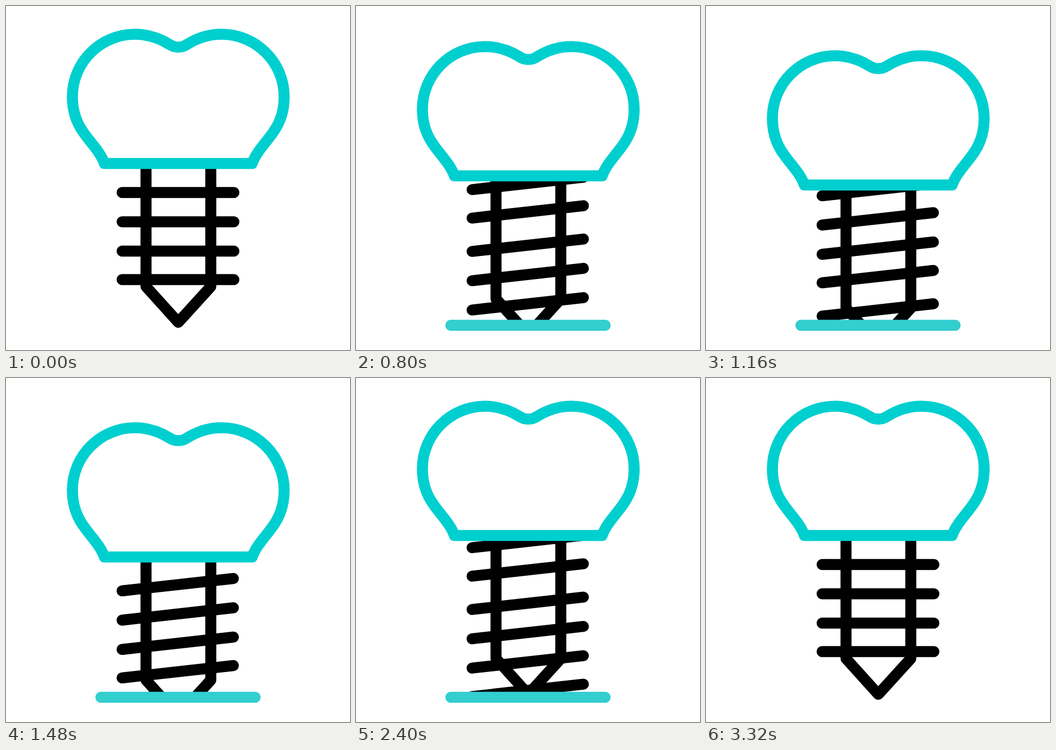
These frames come from a looping animation (640 by 640 pixels, 3.48 s). An HTML page:

```html
<!DOCTYPE html>
<html lang="en">
<head>
<meta charset="utf-8">
<title>Dental implant</title>
<style>
  html, body { margin: 0; height: 100%; overflow: hidden; background: #fff; }
  svg { display: block; width: 100vw; height: 100vh; }
  path { fill: none; stroke: #000; stroke-width: 20.5; stroke-linecap: round; stroke-linejoin: round; }
  #crown path { fill: #fff; stroke: #00cfcf; }
  #ground { stroke: #33cece; }
</style>
</head>
<body>
<svg viewBox="0 0 640 640">
  <clipPath id="above"><rect width="640" height="600"/></clipPath>
  <g clip-path="url(#above)">
    <path id="shaft" d="M260.5 280V522L320.5 588.5L381 522V280"/>
    <path id="thread"/>
  </g>
  <path id="ground"/>
  <g id="crown">
    <path d="M183 293C176 272 157 254 144 235C131 217 123.5 194 123.5 169
      C123.5 105 175.5 52.5 240 52.5C264 52.5 286 60 305 72C314 78 327 78 336 72
      C355 60 377 52.5 401 52.5C465.5 52.5 517.5 105 517.5 169
      C517.5 194 510 217 497 235C484 254 465 272 458 293Z"/>
  </g>
</svg>
<script>
const LOOP = 3480, TURN = 224, SINK = 40;
const bars = [0, 54.5, 109, 162].flatMap(y => [y, y - TURN]);
const el = id => document.getElementById(id);
const shaft = el('shaft'), thread = el('thread'), ground = el('ground'), crown = el('crown');

const part = (t, from, to) => Math.min(1, Math.max(0, (t - from) / (to - from)));
const smooth = p => p * p * (3 - 2 * p);
// Starts at some speed and settles gently
const settle = p => smooth(p) + 0.7 * p * (1 - p) ** 2;
// Goes from 0 to 1 and later back to 0
const trip = (t, ease, a, b, c, d) => ease(part(t, a, b)) - ease(part(t, c, d));

function draw(t) {
  const sink = SINK * trip(t, smooth, 510, 1040, 1840, 2370);
  const turn = TURN * trip(t, settle, 480, 1480, 1840, 2840);
  const tilt = trip(t, smooth, 280, 500, 2725, 2940);
  const line = 287 * trip(t, smooth, 40, 460, 2900, 3320);

  const move = `translate(0 ${sink})`;
  crown.setAttribute('transform', move);
  shaft.setAttribute('transform', move);

  const y = 347 + sink + turn;
  thread.setAttribute('d', bars.map(b =>
    `M216 ${y + b + 9 * tilt}L${424 - tilt} ${y + b - 14 * tilt}`).join(''));
  ground.setAttribute('d', line > 0.3 ? `M176.5 594h${line}` : '');
}

const start = performance.now();
function tick() {
  draw((performance.now() - start) % LOOP);
  requestAnimationFrame(tick);
}
tick();
</script>
</body>
</html>
```
